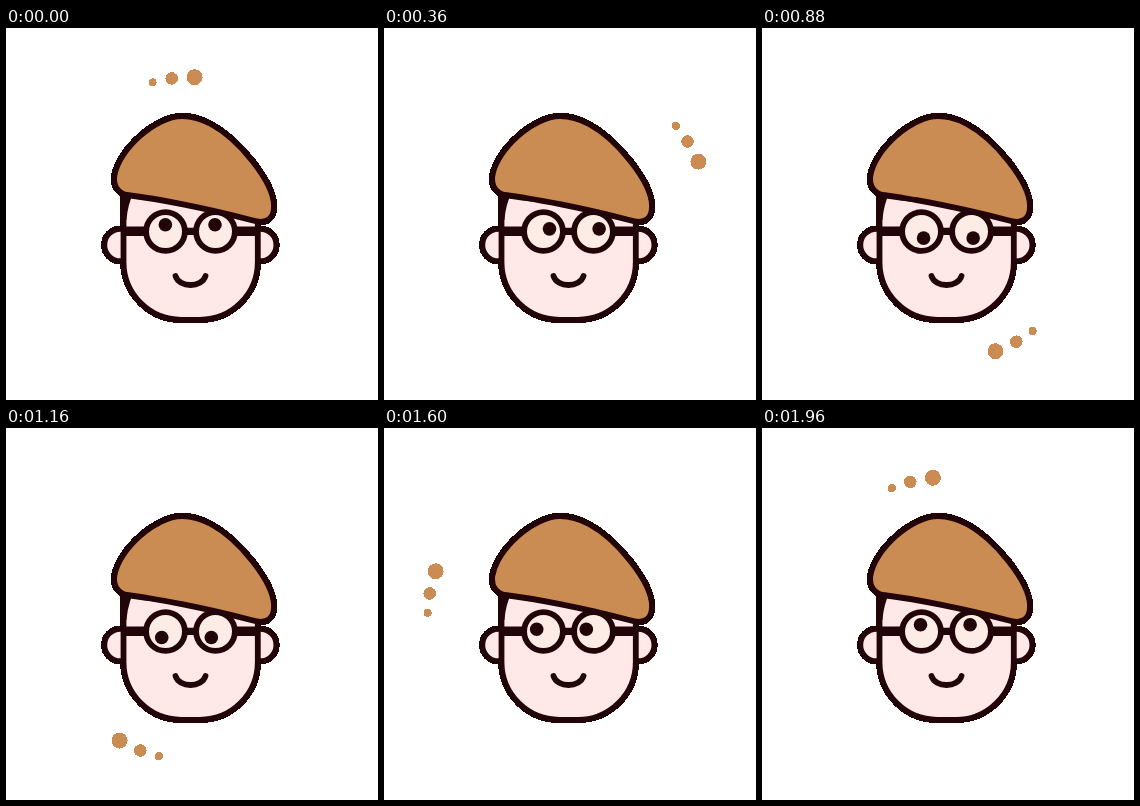
Write an HTML page that moves like this. It is 372 px wide and 372 px high and loops after 2 s.

```html
<!DOCTYPE html>
<html lang="en">
<head>
<meta charset="utf-8">
<title>Looking around</title>
<style>
  html, body { margin: 0; width: 100%; height: 100%; overflow: hidden; background: #fff; }
  svg { display: block; width: 100%; height: 100%; }
  .line { stroke: #210508; stroke-width: 5.8; stroke-linecap: round; stroke-linejoin: round; }
  .skin { fill: #ffe8e7; }
  .tan { fill: #cb8c53; }
  .rim { stroke-width: 6.6; shape-rendering: crispEdges; }
  #dots { shape-rendering: crispEdges; }
  #pupils, .dark { fill: #210508; }
</style>
</head>
<body>
<svg viewBox="0 0 372 372">
  <defs>
    <g id="ears">
      <circle cx="114.5" cy="217" r="16.2"/>
      <circle cx="254.2" cy="217" r="16.2"/>
    </g>
    <path id="head" d="M117.5 166V234A57.8 57.8 0 0 0 175.3 291.8H194A57.8 57.8 0 0 0 251.8 234V186Z"/>
    <path id="hat" d="M176 88C150 88 112.5 121 108.3 148C107 158 112 165.5 121 167C150 170.5 200 180 246 192.3
      C262 197 268 190 268 178C268 154 233 111 205 96C195 90.5 186 88 176 88Z"/>
  </defs>

  <!-- hard outer edge under the smooth drawing -->
  <g class="line rim">
    <use href="#ears"/><use href="#head"/><use href="#hat"/>
  </g>
  <use href="#ears" class="line skin"/>
  <use href="#head" class="line skin"/>
  <path class="dark" d="M117 164H128Q122 175 120.4 192H117Z"/>

  <path class="line" fill="none" d="M169.5 248C173 260 196 260 199.5 248"/>
  <path class="dark" d="M117 198.4H139V208H117ZM230 198.4H252V208H230ZM180 199.8H190V207H180Z"/>
  <g class="line" fill="#fdece5">
    <circle cx="159.5" cy="203.5" r="19.4"/>
    <circle cx="209.5" cy="203.5" r="19.4"/>
  </g>
  <g id="pupils">
    <circle cx="159.2" cy="203.6" r="6.8"/>
    <circle cx="208.8" cy="203.6" r="6.8"/>
  </g>
  <use href="#hat" class="line tan"/>
  <g id="dots" class="tan"></g>
</svg>
<script>
  const LOOP = 2000, STEP = 40;
  const START = 1.5, GAZE = 6.9;
  const orbit = { x: 184.9, y: 190.5, r: 141.4 };
  const trail = [{ r: 8, lag: 0 }, { r: 6.3, lag: 9.3 }, { r: 4, lag: 17.2 }];
  const pupils = document.getElementById('pupils');
  const group = document.getElementById('dots');

  const dots = trail.map(({ r }) => {
    const dot = document.createElementNS('http://www.w3.org/2000/svg', 'circle');
    dot.setAttribute('r', r);
    return group.appendChild(dot);
  });

  // Clockwise offset from the top, angle in degrees.
  function polar(angle, radius) {
    const a = angle * Math.PI / 180;
    return [radius * Math.sin(a), -radius * Math.cos(a)];
  }

  function draw(ms) {
    const time = Math.floor((ms % LOOP) / STEP) * STEP;
    const angle = START + 360 * time / LOOP;
    dots.forEach((dot, i) => {
      const [x, y] = polar(angle - trail[i].lag, orbit.r);
      dot.setAttribute('cx', orbit.x + x);
      dot.setAttribute('cy', orbit.y + y);
    });
    pupils.setAttribute('transform', `translate(${polar(angle, GAZE)})`);
  }

  let start;
  function tick(now) {
    start ??= now;
    draw(now - start);
    requestAnimationFrame(tick);
  }
  draw(0);
  requestAnimationFrame(tick);
</script>
</body>
</html>
```
